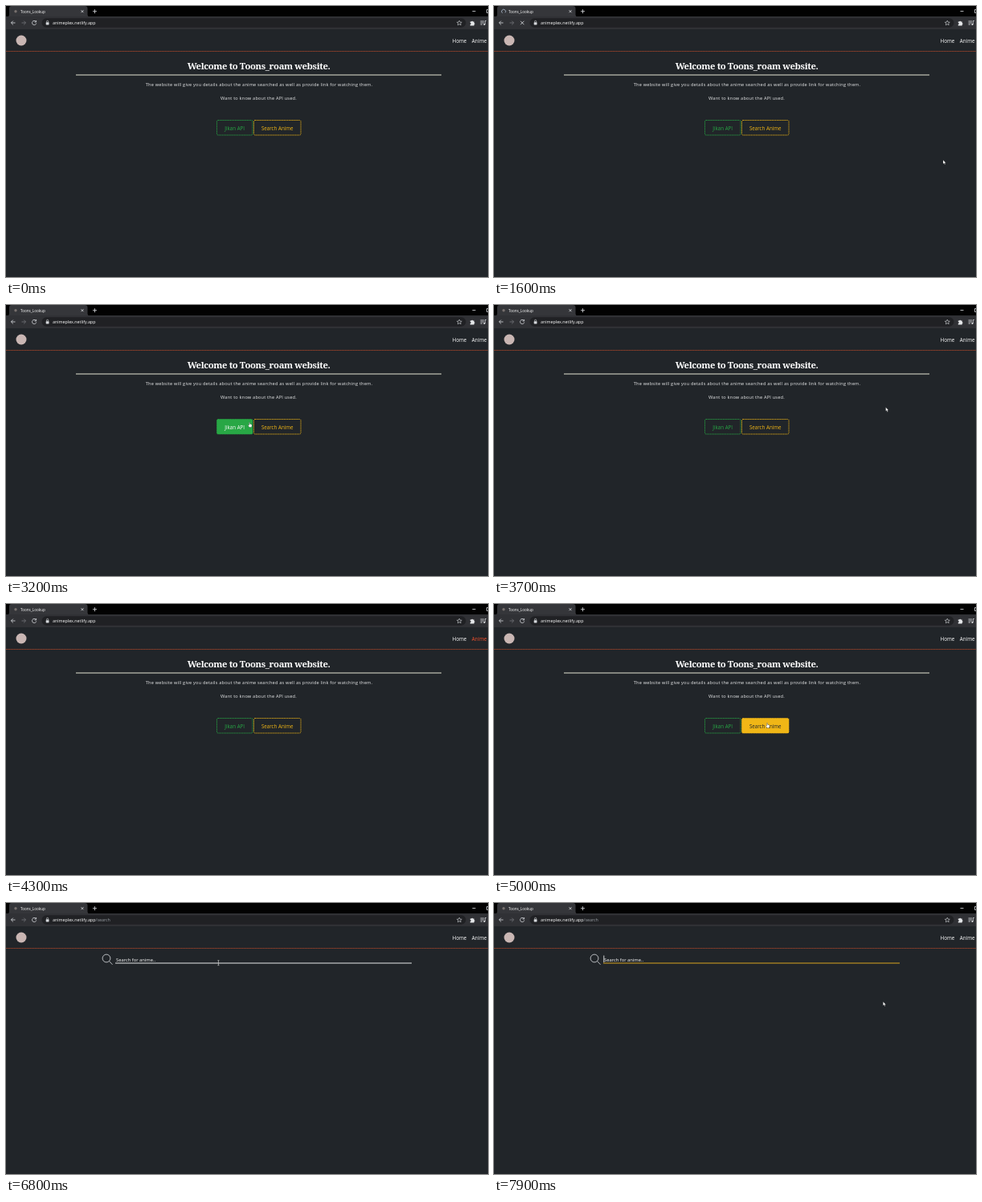
An HTML page for the animation above (8000 ms loop, 600 by 338 pixels).

```html
<!DOCTYPE html>
<html lang="en">
<head>
<meta charset="utf-8">
<title>Toons_Lookup</title>
<style>
html, body { margin: 0; width: 100%; height: 100%; overflow: hidden; background: #212529; }
svg { display: block; width: 100%; height: 100%; font-family: "Open Sans", "Noto Sans", sans-serif; }
text { fill: #fff; white-space: pre; }
.line { fill: none; stroke: #dcdfe2; stroke-width: .8; }
.mid { text-anchor: middle; }
.copy { font-size: 5.6px; letter-spacing: .21px; fill: #e9eaeb; }
.nav { font-size: 6.3px; }
.btn { font-size: 6.2px; }
.btn rect { stroke: var(--c); fill: none; stroke-width: .9; stroke-dasharray: 1.3 .8; }
.btn text { fill: var(--c); }
.btn.on rect { fill: var(--c); }
.btn.on text { fill: var(--t); }
.nav.on { fill: #f4502c; }
</style>
</head>
<body>
<svg viewBox="0 0 600 338" preserveAspectRatio="none">
  <rect width="600" height="338" fill="#212529"/>

  <!-- browser frame -->
  <rect width="600" height="14" fill="#020202"/>
  <path d="M1 13.5Q4 13.5 4 10.5V3Q4 0 7 0H98Q101.500 0 101.500 3V10.500Q101.500 13.500 104.500 13.500Z" fill="#35363a"/>
  <rect y="13" width="600" height="16" fill="#303135"/>
  <rect x="44.500" y="15.300" width="528" height="11.400" rx="5.700" fill="#202124"/>
  <circle id="favicon" cx="12" cy="6.800" r="1.700" fill="#77706e"/>
  <path id="spinner" class="line" d="M12 4.300A2.500 2.500 0 1 1 9.500 6.800" style="stroke:#a9b6c8"/>
  <text x="18" y="8.600" font-size="4.600" fill="#dfe1e5">Toons_Lookup</text>
  <path class="line" d="M93.500 5.200l3 3m0-3l-3 3M108 6.700h5m-2.500-2.500v5M580.500 6.500h4M598.500 4.500h3v4h-3z"/>
  <path class="line" d="M11.500 21H6.500m2.300-2.400L6.400 21l2.400 2.400"/>
  <path class="line" d="M19.500 21h5m-2.300-2.400l2.400 2.400-2.400 2.400" style="stroke:#74777b"/>
  <path id="reload" class="line" d="M37 19.200A2.600 2.600 0 1 0 37.700 21.500M37.600 18v2h-2"/>
  <path id="stop" class="line" d="M33 18.800l4.400 4.400m0-4.400l-4.400 4.400"/>
  <rect x="49.700" y="20.300" width="3.800" height="3.200" rx=".4" fill="#d5d8db"/>
  <path class="line" d="M50.500 20.300v-.9a1.100 1.100 0 0 1 2.200 0v.9" style="stroke-width:.6"/>
  <text x="58" y="23" font-size="5.350">animeplex.netlify.app<tspan id="path" fill="#9aa0a6">/search</tspan></text>
  <path class="line" d="M564.300 18.200l.9 1.900 2.100.2-1.600 1.400.5 2.100-1.900-1.100-1.900 1.100.5-2.100-1.600-1.400 2.100-.2z" style="stroke-width:.6"/>
  <path d="M577.800 19.600h1.400a1.100 1.100 0 0 1 2.100 0h1.400v1.500a1.100 1.100 0 0 1 0 2.100v1.400h-4.900v-1.500a1 1 0 0 0 0-2z" fill="#e4e6e8"/>
  <path class="line" d="M590.500 19h4.500M590.500 21h4.500M590.500 23h2.500M596.300 22.800v-4.300h1.500"/>
  <circle cx="595.400" cy="23" r="1.100" fill="#e4e6e8"/>

  <!-- site header -->
  <circle cx="19" cy="43" r="6.500" fill="#c9b6b3"/>
  <path d="M0 56.500H600" stroke="#a2432a" stroke-width=".9" stroke-dasharray="1.500 .5"/>
  <text class="nav" x="555.500" y="45.500">Home</text>
  <text class="nav" id="link" x="579.700" y="45.500">Anime</text>

  <g id="home">
    <text class="mid" x="314.500" y="79" font-size="11.300" font-weight="700" letter-spacing="-.4" style="font-family:'Noto Serif',serif">Welcome to Toons_roam website.</text>
    <path d="M87 86H542" stroke="#e6e6d4" stroke-width="1.100"/>
    <text class="mid copy" x="315" y="100">The website will give you details about the anime searched as well as provide link for watching them.</text>
    <text class="mid copy" x="314.500" y="116.800">Want to know about the API used.</text>
    <g class="btn" id="green" style="--c:#28a745;--t:#fff">
      <rect x="262.500" y="142.500" width="44.500" height="18.500" rx="1.500"/>
      <text class="mid" x="284.700" y="154.700">Jikan API</text>
    </g>
    <g class="btn" id="gold" style="--c:#f0b616;--t:#212529">
      <rect x="308.500" y="142.500" width="58.500" height="18.500" rx="1.500"/>
      <text class="mid" x="337.700" y="154.700">Search Anime</text>
    </g>
  </g>

  <g id="search">
    <circle class="line" cx="125" cy="69" r="4.900"/>
    <path class="line" d="M128.500 72.500l4 4.300"/>
    <text x="137" y="72.600" font-size="5.800" fill="#74787c">Search for anime..</text>
    <path id="rule" d="M136 75H505" stroke-width="1.200"/>
    <path id="caret" d="M136.800 65.500V74" stroke="#fff" stroke-width=".8"/>
  </g>

  <g id="pointer">
    <path id="arrow" d="M0 0V5L1.200 4 2 5.800 2.900 5.400 2.100 3.700H3.600Z" fill="#fff" stroke="#000" stroke-width=".25"/>
    <path id="hand" d="M-.4 .4Q0-.4 .5 .4V2.300L2.500 2.900Q3.300 3.200 3.100 4.200L2.600 6.600H-.2L-1.700 4Q-1.600 3.200-.4 4Z" fill="#fff" stroke="#000" stroke-width=".25"/>
    <path id="beam" d="M-1-3H1M0-3V3M-1 3H1" stroke="#ddd" stroke-width=".6"/>
  </g>
</svg>
<script>
const LOOP = 8000, STEP = 100;
const RELOAD = [1300, 2100], OPEN = 5700, FOCUS = 6900, BLINK = 500;

const ease = {
  in: p => p * p,
  out: p => p * (2 - p),
  both: p => p * p * (3 - 2 * p),
  flat: p => p
};

// time, x, y, easing of the way there
const path = [
  [0, 612, 110], [100, 612, 110], [900, 559, 192, 'out'],
  [1600, 559, 192], [2100, 512, 169, 'both'], [2200, 512, 169],
  [2400, 504, 170], [3100, 303, 146, 'both'], [3200, 303, 146],
  [3500, 390, 154, 'in'], [3750, 512, 121], [4000, 606, 44, 'out'],
  [4300, 606, 44], [4550, 460, 97, 'in'], [4720, 368, 117],
  [4900, 340, 148, 'out'], [5000, 340, 148], [5400, 356.3, 154.8, 'both'],
  [6000, 356.3, 154.8], [6500, 300, 112, 'both'], [6600, 300, 112],
  [6900, 260, 70, 'out'], [7300, 260, 70], [7700, 484.3, 123, 'both'],
  [LOOP, 484.3, 123]
];

const el = {};
document.querySelectorAll('[id]').forEach(n => el[n.id] = n);

const show = (n, on) => n.style.display = on ? '' : 'none';
const inside = ([x, y], l, t, r, b) => x >= l && x <= r && y >= t && y <= b;

function place(t) {
  const i = Math.max(1, path.findIndex(k => k[0] >= t));
  const [t0, x0, y0] = path[i - 1];
  const [t1, x1, y1, kind = 'flat'] = path[i];
  const p = ease[kind]((t - t0) / (t1 - t0));
  return [x0 + (x1 - x0) * p, y0 + (y1 - y0) * p];
}

function draw(t) {
  const pos = place(t);
  const found = t >= OPEN, focused = t >= FOCUS;
  const loading = t >= RELOAD[0] && t < RELOAD[1];
  const onGreen = !found && inside(pos, 262, 142, 307.5, 161.5);
  const onGold = !found && inside(pos, 308, 142, 367.5, 161.5);
  const onLink = inside(pos, 578, 36, 625, 50);
  const onField = found && inside(pos, 136, 63, 505, 76);
  const onTarget = onGreen || onGold || onLink;

  show(el.home, !found);
  show(el.search, found);
  show(el.path, found);
  show(el.reload, !loading);
  show(el.stop, loading);
  show(el.favicon, !loading);
  show(el.spinner, loading);
  el.spinner.setAttribute('transform', `rotate(${t * .36} 12 6.8)`);

  el.green.classList.toggle('on', onGreen);
  el.gold.classList.toggle('on', onGold);
  el.link.classList.toggle('on', onLink);

  el.rule.setAttribute('stroke', focused ? '#d9a520' : '#e8e9ea');
  show(el.caret, focused && Math.floor((t - FOCUS) / BLINK) % 2 === 0);

  el.pointer.setAttribute('transform', `translate(${pos})`);
  show(el.hand, onTarget);
  show(el.beam, onField);
  show(el.arrow, !onTarget && !onField);
}

const start = performance.now();
function tick() {
  const t = (performance.now() - start) % LOOP;
  draw(Math.floor(t / STEP) * STEP);
  requestAnimationFrame(tick);
}
tick();
</script>
</body>
</html>
```
